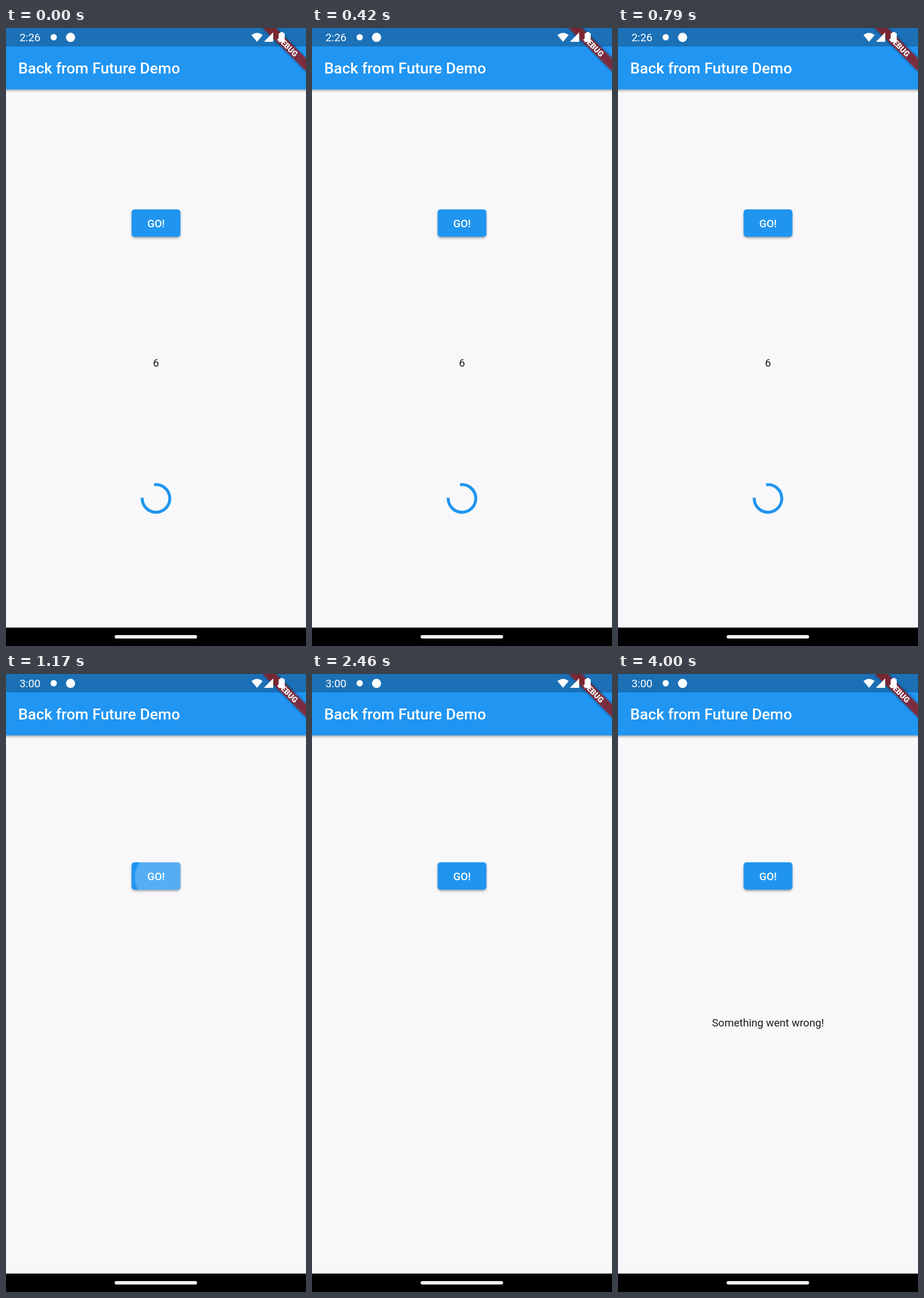
An HTML page that plays this animation: 522 by 1073 pixels, repeating every 4040 ms.

```html
<!DOCTYPE html>
<html lang="en">
<head>
<meta charset="utf-8">
<title>Back from Future Demo</title>
<style>
  html, body { margin: 0; width: 100%; height: 100%; overflow: hidden; background: #f8f8fa; }
  svg { display: block; width: 522px; height: 1073px; }
  text { font-family: Roboto, "Noto Sans", sans-serif; font-size: 18.6px; }
  .light { fill: #fff; }
  .medium { font-weight: 500; }
  .mid { text-anchor: middle; }
</style>
</head>
<body>
<svg viewBox="0 0 522 1073">
  <defs>
    <filter id="soft" x="-20%" y="-60%" width="140%" height="240%"><feGaussianBlur stdDeviation="2"/></filter>
    <filter id="barSoft" x="-5%" y="-20%" width="110%" height="150%"><feGaussianBlur stdDeviation="2.8"/></filter>
    <clipPath id="face"><rect x="218.5" y="315" width="85" height="47.5" rx="5"/></clipPath>
  </defs>

  <rect width="522" height="1073" fill="#f8f8fa"/>

  <rect x="-10" y="20" width="542" height="88" fill="#000" opacity=".42" filter="url(#barSoft)"/>
  <rect width="522" height="106.5" fill="#2095f2"/>
  <rect width="522" height="32" fill="#1b70b6"/>
  <text class="light medium" x="21.3" y="79.3" style="font-size:26.6px">Back from Future Demo</text>

  <g id="button">
    <rect x="219" y="317.5" width="84" height="47" rx="5" fill="#000" opacity=".38" filter="url(#soft)"/>
    <rect x="218.5" y="315" width="85" height="47.5" rx="5" fill="#2095f0"/>
    <g clip-path="url(#face)"><circle id="ripple" fill="#fff"/></g>
    <text class="light medium mid" x="261" y="345.6">GO!</text>
  </g>

  <g id="waiting">
    <text class="mid" x="261" y="588.3" fill="#1c1c1c">6</text>
    <path id="arc" fill="none" stroke="#2095f0" stroke-width="5.2"/>
  </g>
  <text id="error" class="mid" x="261" y="612.4" fill="#1c1c1c">Something went wrong!</text>

  <!-- corner ribbon -->
  <g transform="translate(522 0) rotate(45)">
    <rect x="-53" y="37.2" width="106" height="16" fill="#000" opacity=".5" filter="url(#soft)"/>
    <rect x="-60" y="37.2" width="120" height="16" fill="#b71c1c" opacity=".63"/>
    <text class="light mid" x="0" y="50" style="font-size:13.6px;font-weight:900">DEBUG</text>
  </g>

  <!-- status bar -->
  <text id="clock" class="light" x="23.4" y="23.2" style="font-size:19px">2:26</text>
  <g class="light">
    <circle cx="83" cy="16" r="5.5"/>
    <circle cx="112.3" cy="16.3" r="8"/>
    <path d="M427 12.2Q436.800 4.600 446.600 12.200L436.800 24Z"/>
    <path d="M465 7.500V24H448.700Z"/>
    <path d="M477.300 7H482.500V9H485V24.500H474.500V9H477.300Z"/>
  </g>

  <rect y="1041" width="522" height="32"/>
  <rect x="189" y="1054" width="143.500" height="6" rx="3" fill="#f2f2f2"/>
</svg>
<script>
  const LOOP = 4040, CUT = 960, TAP = 1040, FAIL = 3200;
  const GROW = 225, FADE = 150;
  const $ = id => document.getElementById(id);
  const clamp = v => Math.min(1, Math.max(0, v));
  const lerp = (a, b, k) => a + (b - a) * k;
  const show = (el, on) => { el.style.display = on ? '' : 'none'; };
  const button = $('button'), ripple = $('ripple'), waiting = $('waiting');
  const error = $('error'), clock = $('clock');

  function arcPath(cx, cy, r, from, to) {
    const at = deg => {
      const a = deg * Math.PI / 180;
      return `${cx + r * Math.cos(a)} ${cy + r * Math.sin(a)}`;
    };
    return `M${at(from)}A${r} ${r} 0 ${to - from > 180 ? 1 : 0} 1 ${at(to)}`;
  }
  $('arc').setAttribute('d', arcPath(261, 816.8, 24, -98, 183));

  // cubic-bezier(.25, .1, .25, 1)
  function ease(x) {
    const curve = (a, b, s) => 3 * a * s * (1 - s) ** 2 + 3 * b * s * s * (1 - s) + s ** 3;
    let lo = 0, hi = 1;
    for (let i = 0; i < 20; i++) {
      const s = (lo + hi) / 2;
      if (curve(.25, .25, s) < x) lo = s; else hi = s;
    }
    return curve(.1, 1, lo);
  }

  function drawRipple(t) {
    const age = t - TAP, k = clamp(age / GROW);
    const alpha = clamp(age / 75) * (1 - clamp((age - GROW) / FADE));
    ripple.setAttribute('cx', lerp(279, 261, k));
    ripple.setAttribute('cy', lerp(344, 339, k));
    ripple.setAttribute('r', 48.7 * lerp(.3, 1, ease(k)));
    ripple.setAttribute('opacity', .24 * alpha);
  }

  function draw(t) {
    const second = t >= CUT;
    clock.textContent = second ? '3:00' : '2:26';
    button.setAttribute('transform', `translate(0 ${second ? 12 : 0})`);
    show(waiting, !second);
    show(error, t >= FAIL);
    drawRipple(t);
  }

  const start = performance.now();
  function tick() {
    draw((performance.now() - start) % LOOP);
    requestAnimationFrame(tick);
  }
  tick();
</script>
</body>
</html>
```
